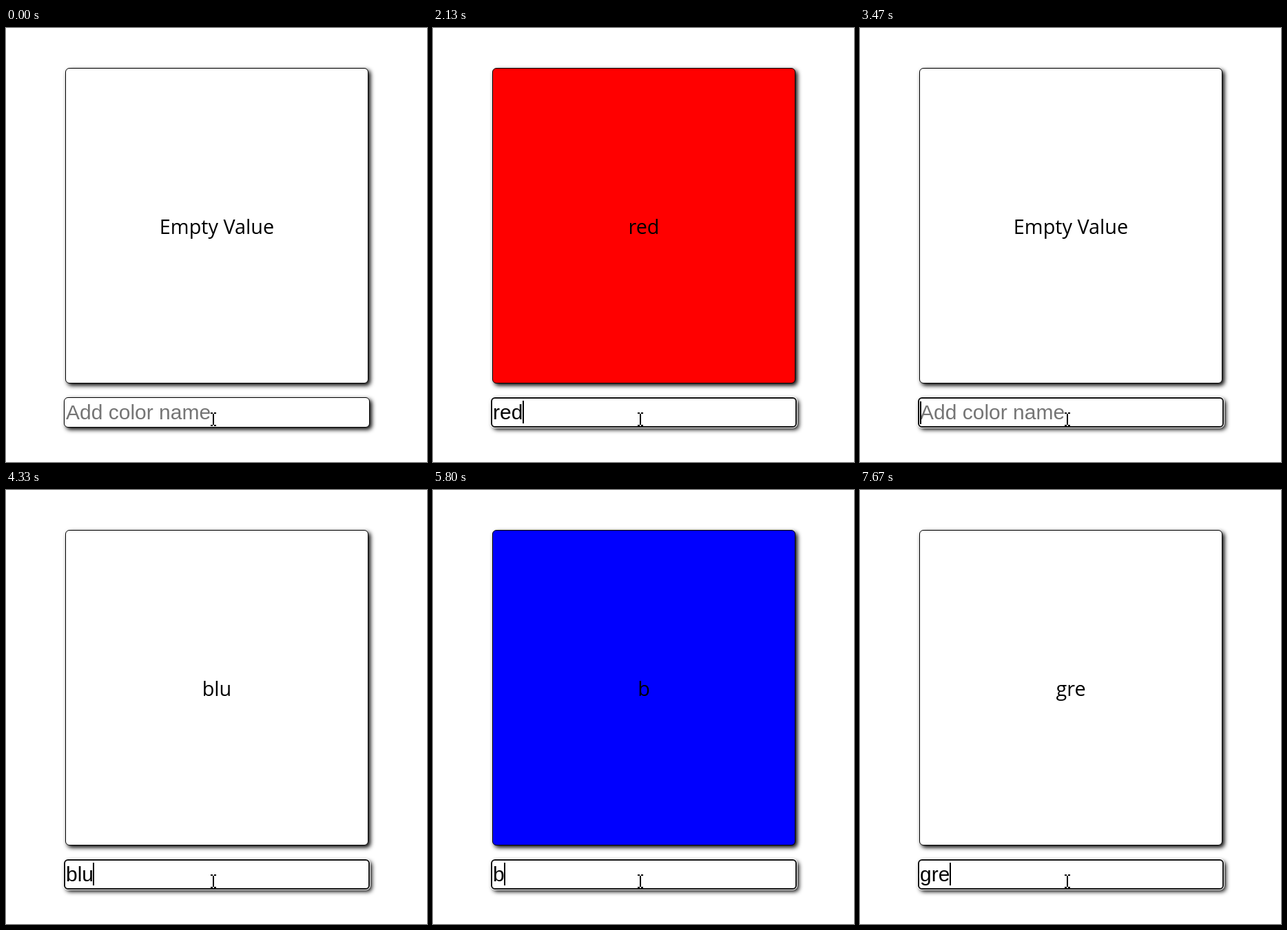
Write an HTML page that moves like this. It is 611 px wide and 630 px high and loops after 8000 ms.

```html
<!DOCTYPE html>
<html lang="en">
<head>
<meta charset="utf-8">
<title>Color name</title>
<style>
  html, body { margin: 0; width: 100%; height: 100%; overflow: hidden; background: #fff; }
  #square, #field, #ring {
    position: absolute; box-sizing: border-box;
    border: 1px solid #000; border-radius: 6px; background: #fff;
  }
  #square, #field { box-shadow: 3px 3px 6px #000; }
  #square { left: 86px; top: 58px; width: 440px; height: 458px; }
  #field, #ring { left: 84px; top: 536px; width: 444px; height: 44px; }
  #ring { border: 2px solid #101010; box-shadow: 0 0 0 1px #fff; }
  svg { position: absolute; left: 0; top: 0; }
  #label { font: 28.8px "Open Sans", "Noto Sans", sans-serif; text-anchor: middle; }
  #entry { font: 30px "Liberation Sans", Arial, sans-serif; }
</style>
</head>
<body>
<div id="square"></div>
<div id="field"></div>
<div id="ring"></div>
<svg width="611" height="630">
  <text id="label" x="306" y="299"></text>
  <text id="entry" x="87" y="568"></text>
  <rect id="caret" width="2" height="33"/>
  <path id="pointer" d="M297 558h3v2h-3zM302 558h3v2h-3zM300 560h2v16h-2zM297 576h3v2h-3zM302 576h3v2h-3z"/>
</svg>
<script>
  const LOOP = 8000;
  const TEXT_START = 86.7;
  const [square, ring, label, entry, caret] =
    ['square', 'ring', 'label', 'entry', 'caret'].map(id => document.getElementById(id));

  // [start ms, typed text, caret visible]
  const steps = [
    [0, '', false], [70, '', true], [600, '', false], [1130, '', true],
    [1530, 'r', true], [1870, 're', true], [2130, 'red', true], [2730, 'red', false],
    [2930, 're', false], [3200, 'r', false], [3270, 'r', true],
    [3470, '', true], [3730, '', false],
    [3930, 'b', true], [4130, 'bl', true], [4330, 'blu', true], [4670, 'blue', true],
    [5200, 'blue', false], [5400, 'blu', false], [5600, 'bl', false],
    [5730, 'bl', true], [5800, 'b', true],
    [5930, '', true], [6270, '', false], [6800, '', true], [7330, '', false],
    [7530, 'g', true], [7600, 'gr', true], [7670, 'gre', true]
  ];

  // A partly erased name keeps the last valid color; an empty field clears it.
  const fillAt = index => {
    for (let i = index; i >= 0; i--) {
      const text = steps[i][1];
      if (text === '') return '#fff';
      if (text === 'red') return '#f00';
      if (text === 'blue') return '#00f';
    }
  };

  function render(index) {
    const [, text, caretOn] = steps[index];
    square.style.background = fillAt(index);
    ring.style.visibility = index > 0 ? 'visible' : 'hidden';
    label.textContent = text || 'Empty Value';
    entry.textContent = text || 'Add color name';
    entry.setAttribute('fill', text ? '#000' : '#757575');
    caret.setAttribute('x', text ? Math.floor(TEXT_START + entry.getComputedTextLength()) : 87);
    caret.setAttribute('y', text ? 541 : 542);
    caret.style.visibility = caretOn ? 'visible' : 'hidden';
  }

  const startTime = performance.now();
  let shown = -1;

  function tick() {
    const time = (performance.now() - startTime) % LOOP;
    let index = steps.length - 1;
    while (steps[index][0] > time) index--;
    if (index !== shown) render(shown = index);
    requestAnimationFrame(tick);
  }
  tick();
</script>
</body>
</html>
```
